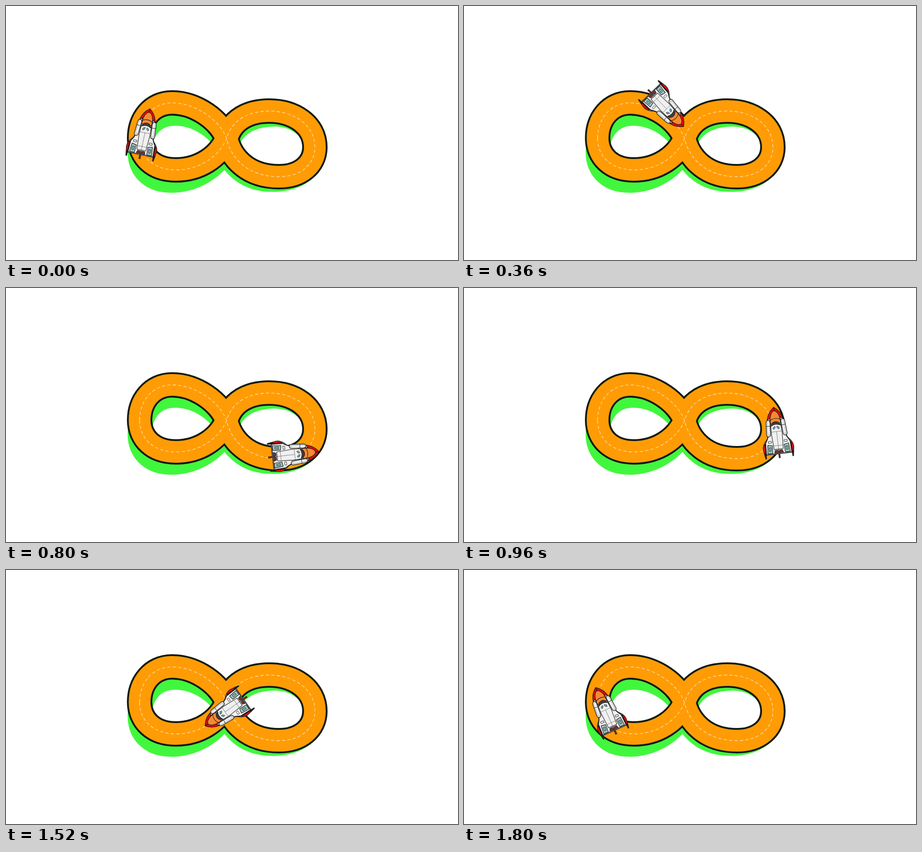
These frames come from a looping animation (998 px wide and 561 px high, 1840 ms). An HTML page:

```html
<!DOCTYPE html>
<html lang="en">
<head>
<meta charset="utf-8">
<title>Shuttle loop</title>
<style>
  html, body { margin: 0; width: 100%; height: 100%; overflow: hidden; background: #fff; }
  svg { display: block; width: 100%; height: 100%; }
</style>
</head>
<body>
<svg viewBox="0 0 998 561" xmlns="http://www.w3.org/2000/svg">
  <defs>
    <path id="lane" fill="none" stroke-linejoin="round" d="M295 292
      C295 250 322 214 367 214 C420 214 474 254 487 293
      C496 334 532 377 603 377 C650 377 682 350 682 312
      C682 262 635 232 581 232 C535 232 498 252 487 293
      C470 333 427 362 375 362 C325 362 295 332 295 292Z"/>

    <g id="half" stroke="#1c1a1a" stroke-width="1.2" stroke-linejoin="round">
      <!-- wing with red edge and fin -->
      <path fill="#f1f1f1" d="M0 -8 H13 L20 10 C22 20 32 20 32 32 V50 H0Z"/>
      <path fill="#e00c0c" d="M27 25 C33 26 34 32 34 38 L31 58 L28 50Z"/>
      <path fill="none" stroke-width="2" d="M20 8 C21 19 28 20 29 30 V50"/>
      <path fill="#2a2526" d="M29 47 H32 L30.5 59 L29 58Z"/>
      <!-- red nose side -->
      <path fill="#e00c0c" d="M0 -53 C10 -46 16 -36 18 -24 L10 -18 L0 -44Z"/>
      <path fill="#f4f4f4" d="M12 -30 L17 -26 L18 -15 L11 -14Z"/>
      <!-- booster -->
      <path fill="#cfd1d3" d="M12 -20 C12 -28 20 -28 21 -20 L23 7 C22 12 16 12 14 8Z"/>
      <path fill="#f5f5f5" stroke="none" d="M14 -20 C14 -24 17 -24 17 -20 L19 5 H16Z"/>
      <path fill="none" stroke-width=".9" d="M12.5 -12 L21.5 -13"/>
      <!-- engine panel and details -->
      <path fill="#9fc5c0" d="M13 31 L23 29 L25 48 H14Z"/>
      <path fill="#84b0ac" stroke-width=".8" d="M16 35 H21 V43 H17Z"/>
      <path fill="#fff" stroke-width=".9" d="M14 21 H21 V25 H14Z"/>
      <path fill="#6e3434" stroke-width=".9" d="M2 42 H8 L10 48 H1Z"/>
    </g>

    <g id="shuttle" stroke="#1c1a1a" stroke-width="1.1" stroke-linejoin="round">
      <path d="M0 48 V60" stroke-width="4"/>
      <path d="M0 50 V59" stroke="#b81c1c" stroke-width="1.8"/>
      <use href="#half"/>
      <use href="#half" transform="scale(-1 1)"/>
      <path fill="#f0f0f0" d="M-11 -18 H11 L12 6 L10 40 H-10 L-12 6Z"/>
      <path fill="#f58a32" d="M-11 -17 C-12 -32 -7 -44 0 -45 C7 -44 12 -32 11 -17Z"/>
      <path fill="none" d="M-11 -25 Q0 -31 11 -25"/>
      <path fill="#45393a" d="M-10 -12 C-9 -24 9 -24 10 -12 Q0 -18 -10 -12Z"/>
      <path fill="#72b4d0" stroke-width=".8" d="M-7 -8 L-2 -11 V-7 L-6 -4Z M7 -8 L2 -11 V-7 L6 -4Z"/>
      <path fill="none" stroke="#777" stroke-width=".9" d="M0 1 V40 M-11 1 H11 M-10 32 H10"/>
      <path d="M-32 50 H32" stroke-width="2.6"/>
      <path d="M-28 50 H28" stroke="#888" stroke-width=".8"/>
    </g>
  </defs>

  <use href="#lane" stroke="#41f73d" stroke-width="54" transform="matrix(1 -.075 0 1 .6 51.25)"/>
  <use href="#lane" stroke="#101a14" stroke-width="56"/>
  <use href="#lane" stroke="#ff9c05" stroke-width="48"/>
  <use href="#lane" stroke="#ffe3bd" stroke-width="1.3" stroke-dasharray="7 5"/>
  <use id="ship" href="#shuttle"/>
</svg>
<script>
  const LOOP = 1840, STEP = 40, BEND = 1.25;
  const ship = document.getElementById('ship');

  // Key points of the flight; heading is in degrees clockwise from up
  const pose = (time, x, y, heading) => ({ time, x, y, angle: (heading - 90) * Math.PI / 180 });
  const route = [
    pose(0, 307, 279, 12), pose(360, 448, 228, 136), pose(640, 537, 349, 116),
    pose(960, 690, 316, -7), pose(1240, 577, 228, -109), pose(1520, 483, 314, -125),
    pose(1800, 312, 308, -24)
  ];
  route.push({ ...route[0], time: LOOP });

  // Cubic curve from p0 to p1 with end slopes m0 and m1: value and slope at u
  function hermite(p0, p1, m0, m1, u) {
    const a = m0 + m1 - 2 * (p1 - p0), b = 3 * (p1 - p0) - 2 * m0 - m1;
    return [p0 + u * (m0 + u * (b + u * a)), m0 + u * (2 * b + u * 3 * a)];
  }

  // The ship leaves and reaches each key point along its heading
  function draw(time) {
    const now = Math.floor(time % LOOP / STEP) * STEP;
    const next = route.findIndex(p => p.time > now);
    const from = route[next - 1], to = route[next];
    const u = (now - from.time) / (to.time - from.time);
    const pull = BEND * Math.hypot(to.x - from.x, to.y - from.y);
    const [x, dx] = hermite(from.x, to.x, pull * Math.cos(from.angle), pull * Math.cos(to.angle), u);
    const [y, dy] = hermite(from.y, to.y, pull * Math.sin(from.angle), pull * Math.sin(to.angle), u);
    const turn = Math.atan2(dy, dx) * 180 / Math.PI + 90;
    ship.setAttribute('transform', `translate(${x} ${y}) rotate(${turn})`);
  }

  const start = performance.now();
  function tick() {
    draw(performance.now() - start);
    requestAnimationFrame(tick);
  }
  draw(0);
  requestAnimationFrame(tick);
</script>
</body>
</html>
```
